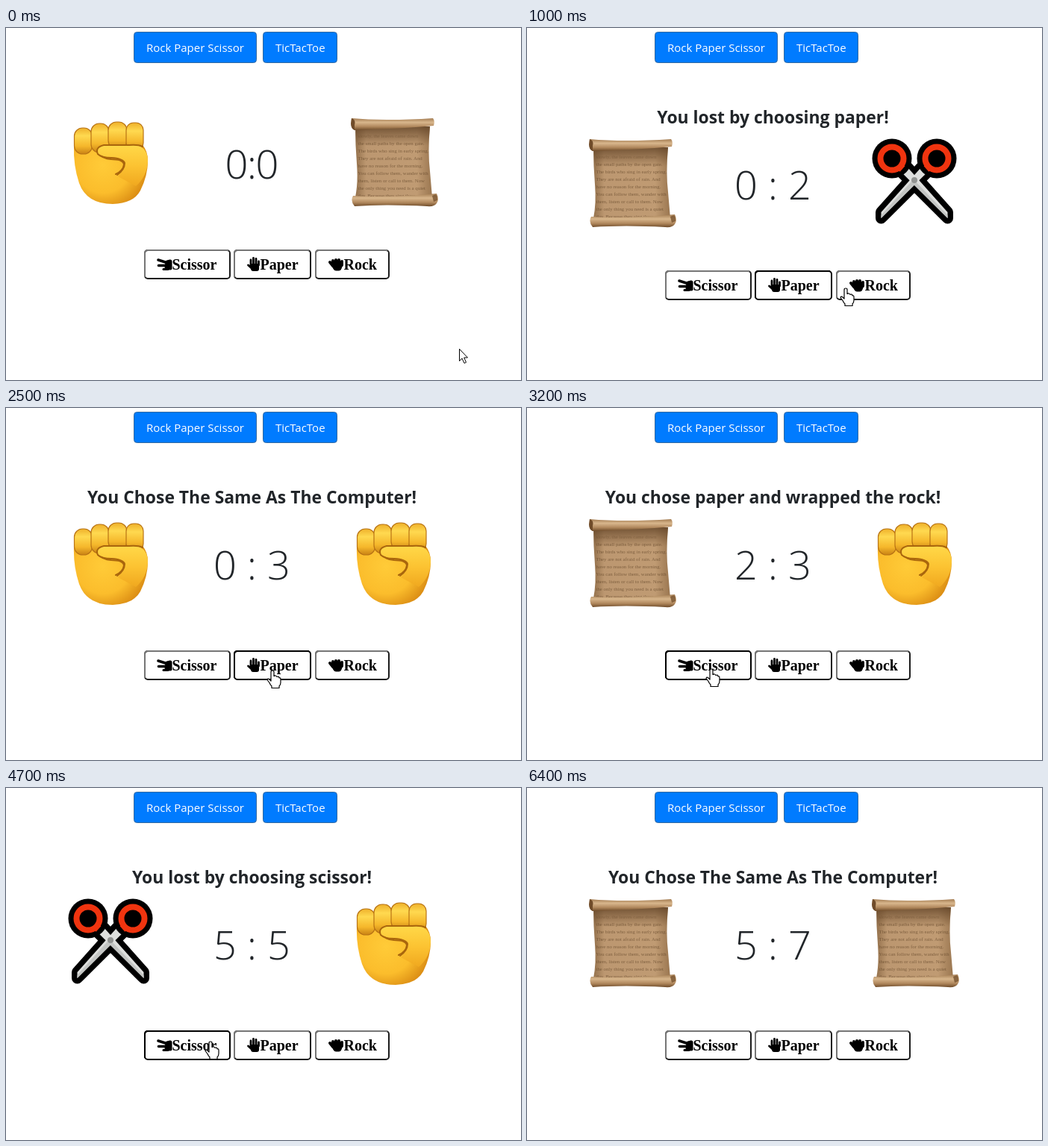
An HTML page for the animation above (6500 ms loop, 690 by 472 pixels).

```html
<!DOCTYPE html>
<html lang="en">
<head>
<meta charset="utf-8">
<title>Rock Paper Scissor</title>
<style>
  html, body { margin: 0; width: 100%; height: 100%; overflow: hidden; background: #fff; }
  svg { display: block; width: 690px; height: 472px; }
  text { font-family: "Open Sans", "Noto Sans", sans-serif; fill: #212529; }
  .nav rect { fill: #007bff; stroke: #33699f; }
  .nav text { font-size: 15px; fill: #fff; }
  #message { font-size: 22.9px; font-weight: 700; text-anchor: middle; }
  #score text { font-size: 54px; font-weight: 300; text-anchor: middle; }
  .pick rect { fill: #fff; stroke: #1c1c1c; stroke-width: 2; }
  .pick .light { fill: none; stroke: #767676; stroke-width: 2; }
  .pick.focus rect { stroke: #000; }
  .pick.focus .light { stroke: #000; }
  .pick text { font: bold 20px "Liberation Serif", serif; fill: #000; }
  .icon { fill: none; stroke: #000; stroke-linecap: round; stroke-linejoin: round; }
  .script text { font: 6.8px "Liberation Serif", serif; fill: #5e4226; opacity: .65; }
  .crease { fill: none; stroke: #a9660d; stroke-width: 2; stroke-linecap: round; }
</style>
</head>
<body>
<svg viewBox="0 0 690 472">
  <defs>
    <radialGradient id="skin" gradientUnits="userSpaceOnUse" cx="130" cy="212" r="62">
      <stop offset="0" stop-color="#ffcb38"/><stop offset=".6" stop-color="#fbbd2c"/>
      <stop offset="1" stop-color="#d98a12"/>
    </radialGradient>
    <linearGradient id="finger" x2="0" y2="1">
      <stop offset="0" stop-color="#eeb02a"/><stop offset=".3" stop-color="#ffd950"/>
      <stop offset=".7" stop-color="#f5b72b"/><stop offset="1" stop-color="#c98214"/>
    </linearGradient>
    <linearGradient id="thumb" x2="0" y2="1">
      <stop offset="0" stop-color="#ffd848"/><stop offset=".5" stop-color="#fcc332"/>
      <stop offset="1" stop-color="#f0a81f"/>
    </linearGradient>
    <linearGradient id="sheet">
      <stop offset="0" stop-color="#94714c"/><stop offset=".14" stop-color="#bc9770"/>
      <stop offset=".8" stop-color="#c09b73"/><stop offset="1" stop-color="#9a7650"/>
    </linearGradient>
    <linearGradient id="shade" x2="0" y2="1">
      <stop offset="0" stop-color="#5a3c20" stop-opacity=".75"/>
      <stop offset="1" stop-color="#5a3c20" stop-opacity="0"/>
    </linearGradient>
    <linearGradient id="roll" x2="0" y2="1">
      <stop offset="0" stop-color="#a37c52"/><stop offset=".35" stop-color="#d8b68c"/>
      <stop offset=".7" stop-color="#b1885d"/><stop offset="1" stop-color="#6f4c2a"/>
    </linearGradient>

    <g id="rock">
      <path fill="url(#skin)" d="M91 186Q90 212 98 236Q108 264 143 264Q171 263 180 246Q190 226 190 206Q190 193 183 185L160 180H110Z"/>
      <g fill="url(#finger)" stroke="#b97415" stroke-width="1.2">
        <rect x="91.5" y="162" width="24" height="35" rx="11"/>
        <rect x="114" y="156" width="24" height="39" rx="11"/>
        <rect x="137" y="154" width="25" height="36" rx="11"/>
        <rect x="161" y="155" width="23" height="37" rx="10"/>
      </g>
      <path class="crease" stroke-width="6" d="M123 196Q129 203 141 204Q157 204 158 211Q157 219 147 224"/>
      <path fill="url(#thumb)" d="M130 185H174Q190 188 190 207Q189 227 174 240L150 227Q161 217 159 208Q155 202 142 201Q129 201 123 197Q119 189 130 185Z"/>
      <path class="crease" d="M183 187Q177 184 165 185H131Q119 188 123 197Q128 202 141 202Q157 203 159 209Q159 218 149 225"/>
    </g>

    <g id="blades">
      <path d="M95.5 255V247L149 187L156 194.7Z"/>
      <path d="M184.5 255V247L131 187L124 194.7Z"/>
    </g>
    <g id="scissor">
      <use href="#blades" stroke="#000" stroke-width="15" stroke-linejoin="round"/>
      <use href="#blades" fill="#dedfdd"/>
      <path fill="#c3c5c3" d="M95.5 255V251L136 206L140 210.5ZM140 204L184.5 251V255L136 207Z"/>
      <circle cx="140" cy="204" r="4" fill="#929492"/>
      <path stroke="#000" stroke-width="18" d="M113 179L125 190M167 179L155 190"/>
      <g fill="#000"><circle cx="110" cy="175" r="26.5"/><circle cx="170" cy="175" r="26.5"/></g>
      <path stroke="#f0340f" stroke-width="10" d="M113 179L124 189M167 179L156 189"/>
      <g fill="#000" stroke="#f0340f" stroke-width="8">
        <circle cx="110" cy="175" r="15.5"/><circle cx="170" cy="175" r="15.5"/>
      </g>
    </g>

    <g id="paper" class="script">
      <path fill="url(#sheet)" d="M89 160H189Q186 195 189 220L192 255H89Q93 235 91 210Q89 185 89 160Z"/>
      <path fill="url(#shade)" d="M89 160H189L187 186H90Z"/>
      <g id="lines"></g>
      <path fill="url(#roll)" d="M84 149Q130 153 193 149Q196 152 194 159Q150 163 88 165Q82 161 84 149Z"/>
      <path fill="#704c2a" d="M84 149Q90 151 88 158L88 165Q83 163 83 156Z"/>
      <path fill="url(#roll)" d="M86 253Q130 256 198 250Q202 258 198 263Q195 268 185 267Q130 264 88 267Q82 260 86 253Z"/>
      <path fill="#704c2a" opacity=".75" d="M192 253Q200 248 199 259L194 261Z"/>
    </g>

    <path id="arrow" fill="#fff" stroke="#000" d="M.5 .5V16.5L4 13L7 19.5L9.5 18.3L6.7 12H11.5Z"/>
    <path id="hand" fill="#fff" stroke="#000" stroke-width="1.2" stroke-linejoin="round"
      d="M-3 2Q-3 0 -1 0Q1 0 1 2V7.5Q4 6 5 8.5Q7.5 7 8 10Q10 9 10 12V16Q10 19 8 21V23.5H-2V21Q-4 19 -5 16.5L-8 12.5Q-7.5 10 -5 12L-3 14Z"/>
  </defs>

  <g class="nav">
    <rect x="171.5" y="5.5" width="164" height="41" rx="4"/><text x="188" y="32">Rock Paper Scissor</text>
    <rect x="344.5" y="5.5" width="99" height="41" rx="4"/><text x="361" y="32">TicTacToe</text>
  </g>
  <text id="message" x="329.5" y="128"></text>
  <g id="board">
    <use id="mine"/><use id="theirs" x="379"/>
    <g id="score"><text y="229.5"></text><text x="329.5" y="229.5">:</text><text y="229.5"></text></g>
    <g id="picks"></g>
  </g>
  <use id="cursor"/>
</svg>
<script>
const LOOP = 6500, STEP = 100;
const $ = id => document.getElementById(id);

// time, player, computer, player score, computer score
const rounds = [
  [0, 'rock', 'paper', 0, 0],
  [600, 'scissor', 'rock', 0, 1],
  [900, 'paper', 'scissor', 0, 2],
  [1300, 'scissor', 'scissor', 0, 2],
  [1700, 'scissor', 'rock', 0, 3],
  [2300, 'rock', 'rock', 0, 3],
  [2600, 'paper', 'rock', 1, 3],
  [2900, 'paper', 'rock', 2, 3],
  [3300, 'scissor', 'paper', 3, 3],
  [3700, 'rock', 'paper', 3, 4],
  [3900, 'rock', 'scissor', 4, 4],
  [4300, 'rock', 'scissor', 5, 4],
  [4600, 'scissor', 'rock', 5, 5],
  [5100, 'scissor', 'rock', 5, 6],
  [5500, 'rock', 'rock', 5, 6],
  [5800, 'rock', 'paper', 5, 7],
  [6100, 'paper', 'paper', 5, 7]
];
// time, x, y of the pointer tip
const moves = [
  [0, 607, 430], [100, 590, 420], [500, 275, 347], [600, 275, 347], [800, 360, 349],
  [1000, 428, 349], [1200, 280, 351], [1600, 280, 348], [1800, 297, 343],
  [2200, 455, 350], [2500, 358, 352], [2900, 355, 350], [3200, 248, 350],
  [3600, 465, 350], [4000, 475, 349], [4300, 472, 349], [4500, 285, 345],
  [4700, 275, 340], [5100, 272, 342], [5400, 462, 342], [5800, 460, 346],
  [6000, 360, 350], [6100, 358, 355], [6200, 355, 480]
];
const wins = {
  rock: 'rock and broke the scissors',
  paper: 'paper and wrapped the rock',
  scissor: 'scissor and cut the paper'
};
const beats = { rock: 'scissor', paper: 'rock', scissor: 'paper' };

const picks = [
  { name: 'scissor', label: 'Scissor', x: 185, w: 116, textX: 222.5,
    icon: '<path stroke-width="3.6" d="M204 339L215 342.5M204.5 346.5H215"/><path stroke-width="5" d="M216 342L220 341V350L215 349Z"/><path stroke-width="3" d="M211 351.5H217"/>' },
  { name: 'paper', label: 'Paper', x: 305, w: 104, textX: 340.5,
    icon: '<path stroke-width="2.8" d="M328 346V339M331.5 346V336.5M335 346V337.5M338.5 346V341M324.5 346L329 350"/><path stroke-width="6" d="M330 347H336V351H331Z"/>' },
  { name: 'rock', label: 'Rock', x: 414, w: 100, textX: 452.5,
    icon: '<path stroke-width="4" d="M434 342L438 347M438 340V345M442 339V345M446 339V345M450 341V346"/><path stroke-width="7" d="M439 345H448L446 350H442Z"/>' }
];
$('picks').innerHTML = picks.map(({ name, label, x, w, textX, icon }) => `
  <g class="pick" id="pick-${name}">
    <rect x="${x + 1}" y="326" width="${w - 2}" height="38" rx="4"/>
    <path class="light" d="M${x + 1} 362V330Q${x + 1} 326 ${x + 5} 326H${x + w - 3}"/>
    <g class="icon">${icon}</g><text x="${textX}" y="352">${label}</text>
  </g>`).join('');

$('lines').innerHTML = [
  'slowly, the leaves came down', 'the small paths by the open gate.', 'The birds who sing in early spring.',
  'They are not afraid of rain. And', 'have no reason for the morning.', 'You can follow them, wander with',
  'them, listen or call to them. Now', 'the only thing you need is a quiet', 'day. Because they sing there.'
].map((line, i) => `<text x="92.5" y="${174.5 + i * 10}"${i ? '' : ' style="opacity:.4"'}>${line}</text>`).join('');

const lastAt = (table, t) => table.filter(row => row[0] <= t).pop();

function pointerAt(t) {
  const from = lastAt(moves, t);
  const to = moves[moves.indexOf(from) + 1] || from;
  const part = to === from ? 0 : (t - from[0]) / (to[0] - from[0]);
  const ease = part * part * (3 - 2 * part);
  return [1, 2].map(i => Math.round(from[i] + (to[i] - from[i]) * ease));
}

function messageFor([time, mine, theirs]) {
  if (!time) return '';
  if (mine === theirs) return 'You Chose The Same As The Computer!';
  return beats[mine] === theirs ? `You chose ${wins[mine]}!` : `You lost by choosing ${mine}!`;
}

let shown = -1;
function draw(now) {
  const t = Math.floor(now % LOOP / STEP) * STEP;
  if (t !== shown) render(shown = t);
  requestAnimationFrame(draw);
}

function render(t) {
  const round = lastAt(rounds, t);
  const [time, mine, theirs, won, lost] = round;
  const lift = time ? 0 : 28;
  $('board').setAttribute('transform', `translate(0 ${-lift})`);
  $('message').textContent = messageFor(round);
  $('mine').setAttribute('href', '#' + mine);
  $('theirs').setAttribute('href', '#' + theirs);

  const [left, , right] = $('score').children;
  const gap = time ? 36 : 20.5;
  left.textContent = won;
  right.textContent = lost;
  left.setAttribute('x', 329.5 - gap);
  right.setAttribute('x', 329.5 + gap);

  // A button takes focus on press, just before the result appears.
  const pressed = lastAt(rounds, t + STEP);
  for (const { name } of picks) {
    const focused = pressed[0] > 0 && t < 6400 && pressed[1] === name;
    $('pick-' + name).classList.toggle('focus', focused);
  }

  const [x, y] = pointerAt(t);
  const over = y >= 325 - lift && y <= 365 - lift && picks.some(p => x >= p.x && x <= p.x + p.w);
  $('cursor').setAttribute('href', over ? '#hand' : '#arrow');
  $('cursor').setAttribute('transform', `translate(${x} ${y})`);
}

render(0);
requestAnimationFrame(draw);
</script>
</body>
</html>
```
